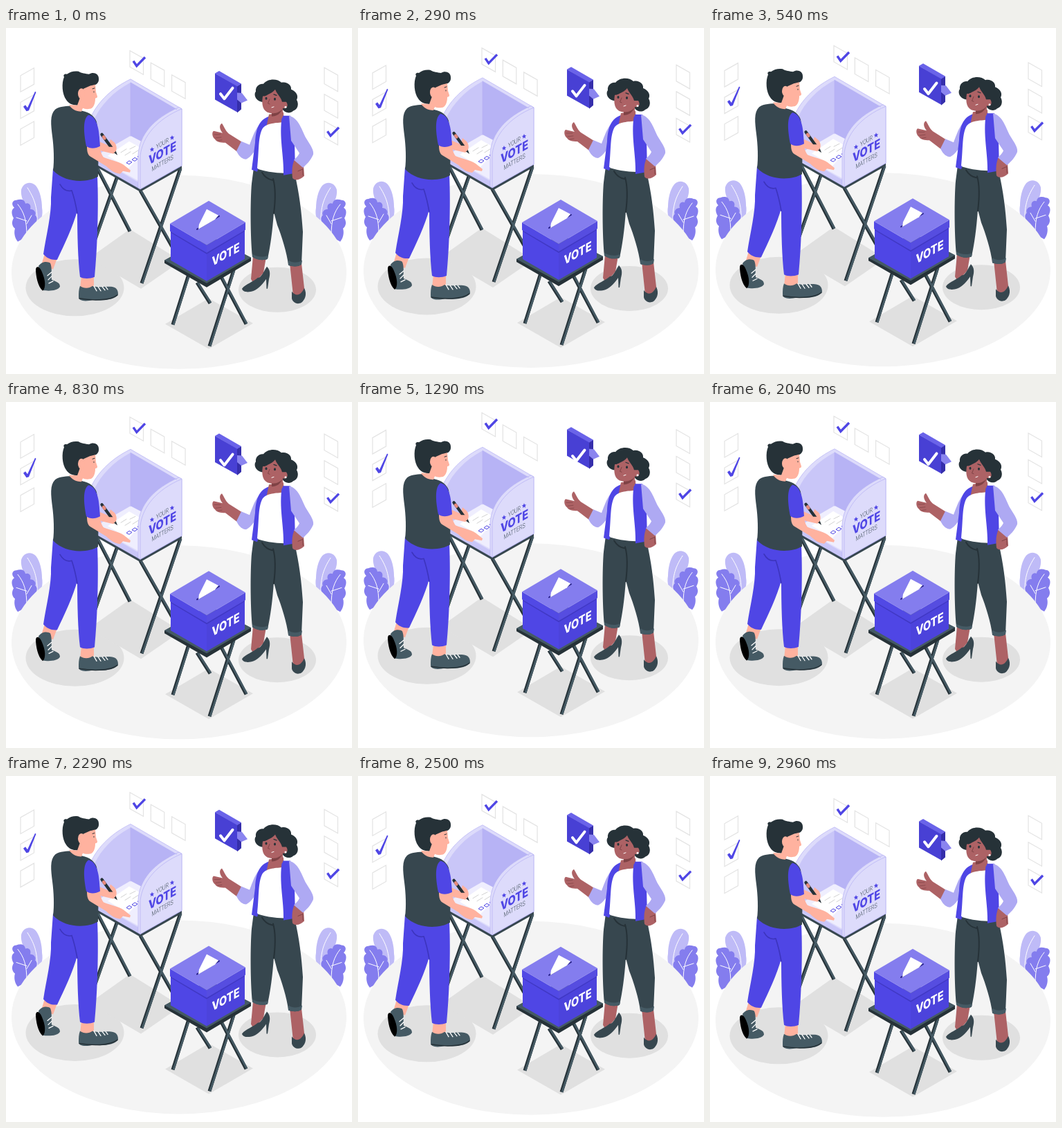
These frames come from a looping animation (500 by 500 pixels, 3000 ms). An HTML page:

```html
<!DOCTYPE html>
<html lang="en">
<head>
<meta charset="utf-8">
<title>Vote</title>
<style>
html, body { margin: 0; width: 100%; height: 100%; overflow: hidden; background: #fff }
svg { display: block; width: 100%; height: 100% }
.main { fill: #4f46e5 }
.dark { fill: #263238 }
.slate { fill: #37474f }
.steel { fill: #455a64 }
.shade { fill: #e0e0e0 }
.skin { fill: #ffb29f }
.brown { fill: #ad6265 }
.line { fill: none; stroke-linecap: round; stroke-linejoin: round }
.check { fill: none; stroke: #4f46e5; stroke-width: 3.4 }
.edge { stroke: #263238; stroke-width: 5; stroke-linecap: butt }
.face { stroke: #455a64; stroke-width: 2.8; stroke-linecap: butt }
.bold { font: 800 18px Inter, sans-serif }
.thin { font: 300 9.5px Roboto, sans-serif; fill: #37474f }
text { text-anchor: middle }
</style>
</head>
<body>
<svg viewBox="0 0 500 500">
<defs>
  <path id="box" d="M0 0 19.5 11V34.5L0 23.5Z" fill="#fff" stroke="#e3e3e3" stroke-width="1.2"/>
  <path id="star" class="main" d="M0-3.4 1 -1.2 3.2-1.5 1.5 .6 2.2 3 0 1.8-2 3.4-1.5 .9-3.2-.3-1-1Z"/>
  <g id="plant">
    <path fill="#bfbbf7" d="M36 298C37 285 38 274 32 262 25 253 21 243 22 234 25 223 36 221 43 228 49 235 52 249 52 260 54 270 51 280 44 288Z"/>
    <path class="line" stroke="#fff" d="M31 231C40 245 46 258 45 284"/>
    <path fill="#847dee" d="M17 309C13 304 11 297 13 290 8 286 8 280 11 275 7 268 8 262 12 260 7 255 9 249 15 249 20 247 27 247 28 254 33 252 37 256 35 262 40 262 44 266 42 271 47 274 44 281 41 285L26 304Z"/>
    <path class="line" stroke="#fff" d="M17 255C26 266 30 278 30 300M30 283 37 271M30 279 15 274"/>
  </g>
</defs>

<g id="bubble">
  <path fill="#352eab" d="M334 84 340 81V118L334 123Z"/>
  <path fill="#6a63e9" d="M302 66 308 62.500 340 81 334 85Z"/>
  <path fill="#8a84ef" d="M334 94 341 94.500 349 105 340 109 334 104Z"/>
  <path fill="#4840d4" d="M302 66 334 84.500V122L302 104Z"/>
</g>

<g id="marks">
  <g id="column">
    <use href="#box" x="460" y="57.5"/><use href="#box" x="460" y="96"/><use href="#box" x="460" y="134.7"/>
  </g>
  <use href="#column" transform="matrix(-1 0 0 1 500.5 .6)"/>
  <use href="#box" x="179" y="33"/><use href="#box" x="209.3" y="50.5"/><use href="#box" x="239.6" y="68"/>
  <path class="check" d="M464.5 149.5 469 156 481 144M184 48 188.800 55 201 42.500"/>
  <path class="main" d="M25 114 28 111.500 31 115.500 42 92 43.500 93 33 119.500 29.500 120.500Z"/>
  <path class="line" stroke="#fff" stroke-width="4" d="M310 95.500 315.500 102.500 327.500 87"/>
</g>

<g id="scene">
  <use href="#plant"/>
  <use href="#plant" transform="matrix(-1 0 0 1 500 0)"/>
  <ellipse cx="250" cy="353" rx="242" ry="140" fill="#f4f4f4"/>
  <g class="shade">
    <ellipse cx="99.500" cy="375.500" rx="71" ry="41"/>
    <ellipse cx="392" cy="378.500" rx="56" ry="32.500"/>
    <path d="M179 291 253 337 195 377 120 333ZM230 428 293 391 357 427 293 464Z"/>
  </g>

  <g id="booth">
    <g class="line">
      <path class="edge" d="M132 203 179 294M161 214 129 305M194 235 241 318M252 203 196 369"/>
      <path class="face" d="M133 203 180 293.500M162 214 130 305M195 235 242 317.500M253 203 197 369"/>
    </g>
    <path class="slate" d="M129 196 194 232 254 198V203L194 237 129 200Z"/>
    <path fill="#dddbfb" stroke="#b5b0f4" stroke-width=".7" d="M124 126C134 106 153 87 180 74L254 117V199L194 233 127 195Z"/>
    <path fill="#c9c6f8" d="M128 131C137 112 154 93 180 79V158L128 190Z"/>
    <path fill="#b7b3f5" d="M180 79 247 118 200 172 180 158Z"/>
    <path fill="#efeefe" d="M180 156 203 168 193 222 128 186Z"/>
    <path fill="#c9c6f8" d="M129 187 191 223V231L129 195Z"/>
    <path fill="#fff" d="M147 185 178 164 201 177 177 203Z"/>
    <path class="line" stroke="#d2d2d2" d="M166 180 174 175M172 184 180 179M179 175 187 171M183 182 191 177"/>
    <path fill="none" stroke="#4f46e5" d="M174 195 178 192 182 194 178 197ZM182 190.500 186 187.500 190 189.500 186 192.500ZM190 186 194 183 198 185 194 188Z"/>
    <path fill="#dddbfb" stroke="#b5b0f4" stroke-width=".7" d="M191 231V183C193 154 213 131 250 114.500L254 117V199L194 233Z"/>
    <path fill="none" stroke="#b5b0f4" stroke-width=".7" d="M194 233V185C197 157 218 132 254 117M180 79V157M180 79 247 118"/>
    <use href="#star" x="211" y="175.500"/><use href="#star" x="240" y="158.500"/>
    <text class="thin" transform="matrix(.74 -.43 0 1 226 170)">YOUR</text>
    <text class="bold main" transform="matrix(.81 -.45 0 1 226 187)">VOTE</text>
    <text class="thin" transform="matrix(.74 -.43 0 1 226 198.500)">MATTERS</text>
  </g>

  <g id="man">
    <path class="skin" d="M56 326 51 343 68 349 74 333ZM109 358 107 377 127 378 127 359Z"/>
    <path class="steel" d="M47 344C52 337 60 337 64 340 67 347 65 355 66 364 73 367 78 368 78 374 75 380 61 381 53 379Z"/>
    <path d="M43 349C44 343 49 345 52 353 57 364 58 376 53 380 46 374 43 358 43 349Z"/>
    <path class="steel" d="M107 373C112 377 120 377 125 373 132 376 142 373 152 374 160 375 162 379 162 385 158 393 140 395 126 393 115 396 105 395 105 389 105 383 105 378 107 373Z"/>
    <path class="line" stroke="#263238" stroke-width="1.500" d="M106 391C122 394 150 395 161 386"/>
    <path class="line" stroke="#fff" stroke-width="1.300" d="M61 364 66 359M60 358 66 353M62 369 68 366M127 373 131 380M133 374 137 380M139 374 143 379M144 374 147 378"/>
    <path class="main" d="M68 203C85 220 110 224 132 214 134 260 132 320 128 360 121 363 112 363 107 360 104 335 103 300 103 264 97 287 84 314 74 335 66 336 59 333 54 327 58 300 66 270 65 245Z"/>
    <path class="line" stroke="#3c34bd" stroke-width="1.600" d="M78 226C82 233 88 237 95 235 99 247 101 256 103 268"/>
    <path class="skin" d="M134 164 148 170 151 161 157 166C161 171 161 179 155 182L138 178 132 174Z"/>
    <path class="line" stroke="#263238" stroke-width="4.300" d="M138.500 154 156 178"/>
    <path class="line" stroke="#e88b7c" stroke-width="4.300" stroke-linecap="butt" d="M141 157.500 142.500 159.600"/>
    <path class="dark" d="M154 179 158 176 161 184Z"/>
    <path class="skin" d="M148 172 155 172C161 174 160 180 154 181L146 178Z"/>
    <path class="slate" d="M71 118C78 113 88 113 96 113L110 120C121 122 128 128 131 136L134 160 133 215C118 224 86 225 68 206 70 192 69 172 67 157 65 140 63 126 71 118Z"/>
    <path class="skin" d="M117 168 136 169C136 178 138 183 141 187 151 191 163 193 170 198L180 206 179 209 169 207 165 211C157 210 151 206 145 200L122 186C117 183 117 176 117 168Z"/>
    <path class="main" d="M119 126C128 127 134 139 135 159L136 171C129 175 121 175 116 171 112 150 111 132 119 126Z"/>
    <path class="dark" d="M84 71C82 68 85 66 88 67 93 63 99 62 105 63 109 66 115 66 120 67 126 63 134 66 134 73 135 80 129 84 122 84L112 91 104 112C96 112 90 109 87 104 81 96 80 80 84 71Z"/>
    <path class="skin" d="M112 88 121 84 129 82 130 93 132 99C132 102 130 101 129 102 129 110 126 117 121 117 117 118 113 117 111 116L109 121C101 121 94 117 91 111L103 112 108 98Z"/>
    <ellipse class="skin" cx="109" cy="95" rx="5" ry="7.500"/>
    <path class="line" stroke="#263238" d="M125 88 128 87M127 92V93"/>
  </g>

  <g id="woman">
    <path class="brown" d="M357 330 376 331 372 354 358 370 354 363ZM410 340 427 340 432 385 415 387Z"/>
    <path class="slate" d="M341 377C346 370 358 367 364 361 368 362 372 353 377 345 382 350 382 356 380 363L378 377H376.500L376 363C372 369 365 377 358 380 350 383 342 382 341 377ZM413 381C420 390 427 385 431 376 436 386 431 394 427 397 420 401 414 396 413 391Z"/>
    <path class="slate" d="M358 202C370 207 390 210 402 210L417 210C424 240 427 265 429 295L427 342C421 346 414 345 408 343 406 325 398 300 392 285L387 266C385 295 382 315 378 334 371 337 362 335 356 331 353 300 353 250 355 225Z"/>
    <path class="steel" d="M356 327C362 331 372 332 379 329L378 334C370 337 361 335 356 331ZM408 336C414 340 422 340 428 336L427 342C421 346 414 345 408 343Z"/>
    <path class="line" stroke="#263238" stroke-width="2" d="M370 209C374 216 379 219 385 220M386 218C390 232 389 252 387 268"/>
    <path class="brown" d="M313 152C308 146 308 140 312 138 315 142 317 149 322 153L341 165 334 179 317 166C310 166 304 165 302 161 298 158 297 151 300 149Z"/>
    <path class="line" stroke="#7f4245" stroke-width=".7" d="M301 154 310 154M303 159 311 158M306 163 312 162"/>
    <path fill="#aea9f3" d="M376 133C362 139 358 154 352 169L340 164 333 178C337 187 343 190 347 190 355 186 362 176 367 162Z"/>
    <path class="main" d="M380 128C366 133 361 145 360 166L355 205 363 208 382 150Z"/>
    <path class="brown" d="M380 125 401 122 402 142 376 144Z"/>
    <path fill="#fff" d="M371 145C379 136 394 138 402 136L405 205C392 208 374 207 363 203 366 175 364 157 371 145Z"/>
    <path class="main" d="M399 127 411 127 417 165 418 210 401 213C402 185 394 158 399 127Z"/>
    <path class="brown" d="M417 190 430 199 431 214C426 219 418 222 414 217 413 208 413 199 417 190Z"/>
    <path class="line" stroke="#7f4245" d="M422 207 429 204 429 213"/>
    <path fill="#aea9f3" d="M409 127C424 131 427 148 434 160 441 171 445 177 444 183 440 192 434 198 429 202L416 191C420 187 423 184 424 181L412 163Z"/>
    <path class="dark" d="M371 107C362 107 357 97 361 92 360 84 367 80 372 81 378 73 392 73 398 79 406 77 413 83 412 89 420 92 423 99 420 104 424 111 421 118 415 120 410 125 402 122 400 118Z"/>
    <path class="brown" d="M384 115 400 112 400 129C395 136 384 138 379 136L384 126Z"/>
    <path fill="#7f4245" d="M384 122 399 117C397 124 391 128 384 128Z"/>
    <path class="brown" d="M371 99C379 97 386 93 389 89 392 97 397 99 399 107L405 107C409 113 405 118 400 116 397 121 390 125 381 123 371 121 369 111 371 99Z"/>
    <circle cx="404" cy="114.500" r="1.500" fill="#fff"/>
    <path class="line" stroke="#263238" stroke-width="1.300" d="M373.500 98 377 96.500M387 96 391 97.500"/>
    <ellipse class="dark" cx="376" cy="102" rx="1.500" ry="2"/><ellipse class="dark" cx="388.500" cy="103" rx="1.500" ry="2"/>
    <path class="line" stroke="#7f4245" d="M381 103 378.500 109 381 110"/>
    <path class="line" stroke="#fff" d="M384 115 387 114"/>
  </g>

  <g id="ballot">
    <g class="line">
      <path class="edge" d="M265 353 241 429M276 368 295 398M329 350 294 460M310 358 347 428"/>
      <path class="face" d="M266 353 242 429M277 368 296 397.500M330 350 295 460M311 358 348 427.500"/>
    </g>
    <path class="dark" d="M229 336 293 300 354 332V337L290 375 229 340Z"/>
    <path class="steel" d="M229 336 293 300 354 332 290 369Z"/>
    <path class="main" d="M238 290 290 320V366L238 336Z"/>
    <path fill="#4c43dc" d="M290 320 345 288V334L290 366Z"/>
    <path fill="#4038c4" d="M238 293 290 323 345 291V294L290 327 238 296Z"/>
    <path fill="#5149e5" d="M237 283 290 314V325L237 294Z"/>
    <path fill="#564de0" d="M290 314 346 281V292L290 325Z"/>
    <path fill="#847dee" d="M237 283 293 250 346 281 290 314Z"/>
    <path class="line" stroke="#2b258c" stroke-width="2" d="M276 291 308 272"/>
    <path fill="#fff" d="M278 291 279 284 290 262 307 271 302 277Z"/>
    <text class="bold" fill="#fff" transform="matrix(.81 -.45 0 1 317.500 333.500)">VOTE</text>
  </g>
</g>
</svg>
<script>
const period = 3000, lead = 20;
const lift = { scene: 10, marks: 20, bubble: 30 };

function draw(now) {
  const phase = (now + lead) % period / period;
  const rise = 1 - Math.abs(1 - 2 * phase);
  for (const id in lift)
    document.getElementById(id).setAttribute('transform', `translate(0 ${-lift[id] * rise})`);
  requestAnimationFrame(draw);
}
draw(0);
</script>
</body>
</html>
```
